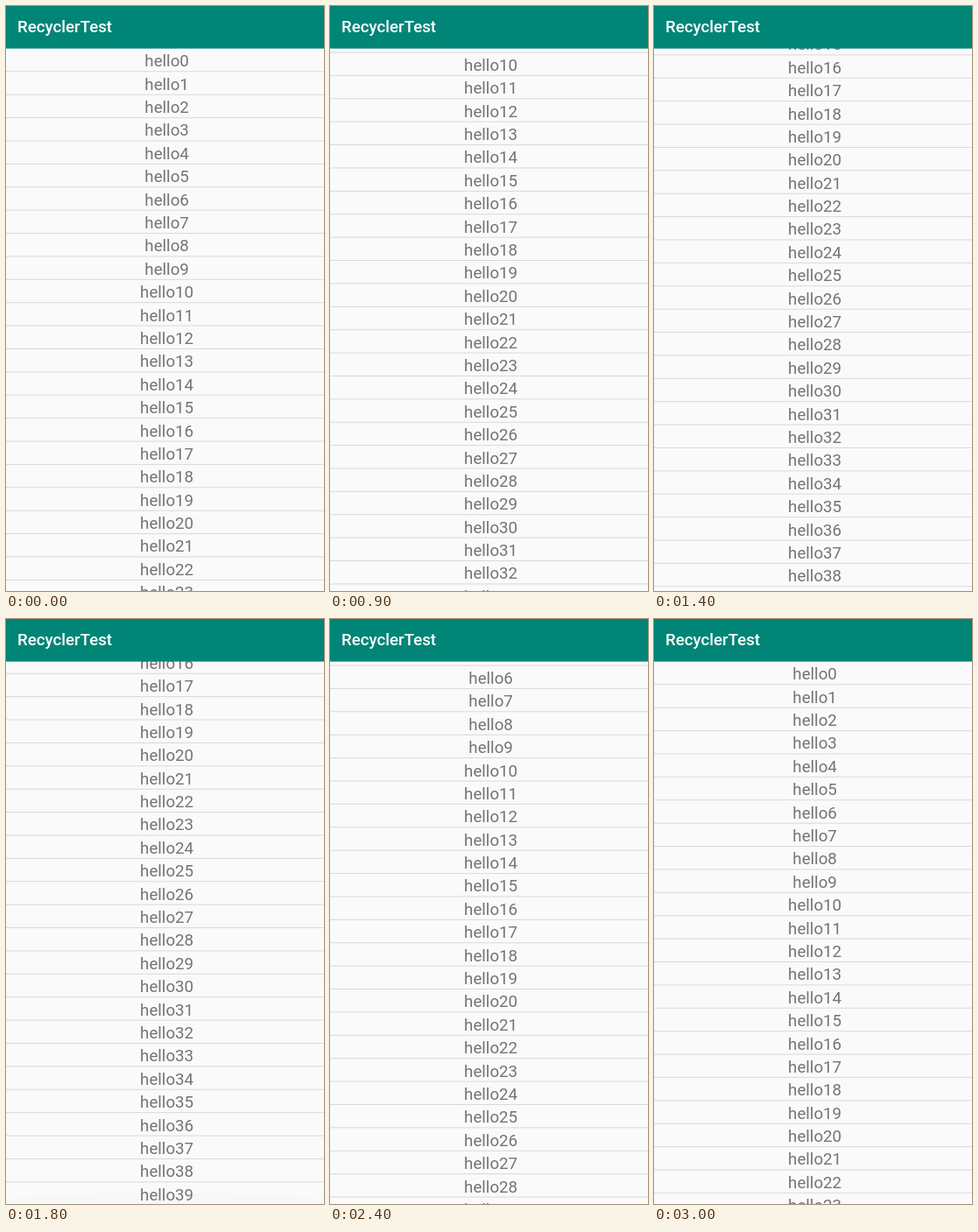
Animation, 363 px wide and 668 px high, one loop 3800 ms. Source, as an HTML page with a canvas:

```html
<!DOCTYPE html>
<html lang="en">
<head>
<meta charset="utf-8">
<title>RecyclerTest</title>
<style>
  html, body { margin: 0; width: 100%; height: 100%; overflow: hidden; background: #fafafa; }
  canvas { display: block; width: 363px; height: 668px; }
</style>
</head>
<body>
<canvas id="stage" width="363" height="668"></canvas>
<script>
const W = 363, H = 668, LOOP = 3800, STEP = 100;
const BAR = 48.6, PITCH = 26.39, ROWS = 40, CENTER = 183.6;
const ctx = document.getElementById('stage').getContext('2d');

// Each swipe: start time in ms, then the scroll offset after every step.
const swipes = [
  [500, 8.5, 58, 130, 203, 259.3, 287],
  [1100, 297, 338, 381, 414.8, 432, 434.8],
  [2100, 421, 352, 254, 153.7, 88, 62],
  [2800, 48, 17, 0]
];

function scrollAt(t) {
  let y = 0;
  for (const [start, ...stops] of swipes) {
    if (t < start) break;
    y = stops[Math.min(Math.floor((t - start) / STEP), stops.length - 1)];
  }
  return y;
}

// Overscroll glow at the end of the list, fading in steps.
function drawGlow(t) {
  if (t < 1600 || t >= 2100) return;
  const k = Math.max(0, 1 - Math.floor((t - 1600) / STEP) * 0.4);
  const h = 8 + 28 * Math.max(k, 0.2);
  ctx.fillStyle = `rgba(0, 133, 119, ${0.015 + 0.03 * Math.max(k, 0.2)})`;
  ctx.beginPath();
  ctx.moveTo(0, H);
  ctx.lineTo(0, H - h * 0.4);
  ctx.quadraticCurveTo(W / 2, H - h * 1.6, W, H - h * 0.4);
  ctx.lineTo(W, H);
  ctx.fill();
}

function drawList(offset) {
  ctx.font = '18.7px Roboto, sans-serif';
  ctx.textAlign = 'center';
  const first = Math.max(0, Math.floor(offset / PITCH) - 1);
  for (let i = first; i < ROWS; i++) {
    const top = BAR + i * PITCH - offset;
    if (top > H) break;
    ctx.fillStyle = '#d9d9d9';
    ctx.fillRect(0, top + 25.7, W, 1);
    ctx.fillStyle = '#747474';
    ctx.fillText('hello' + i, CENTER, top + 20.7);
  }
}

function drawBar() {
  ctx.fillStyle = '#008577';
  ctx.fillRect(0, 0, W, BAR);
  ctx.fillStyle = '#fff';
  ctx.font = '500 18.7px Roboto, sans-serif';
  ctx.textAlign = 'left';
  ctx.fillText('RecyclerTest', 13, 30);
}

function draw(now) {
  const t = now % LOOP;
  ctx.fillStyle = '#fafafa';
  ctx.fillRect(0, 0, W, H);
  drawList(scrollAt(t));
  drawGlow(t);
  drawBar();
}

const begin = performance.now();
function tick() {
  draw(performance.now() - begin);
  requestAnimationFrame(tick);
}
tick();
</script>
</body>
</html>
```
